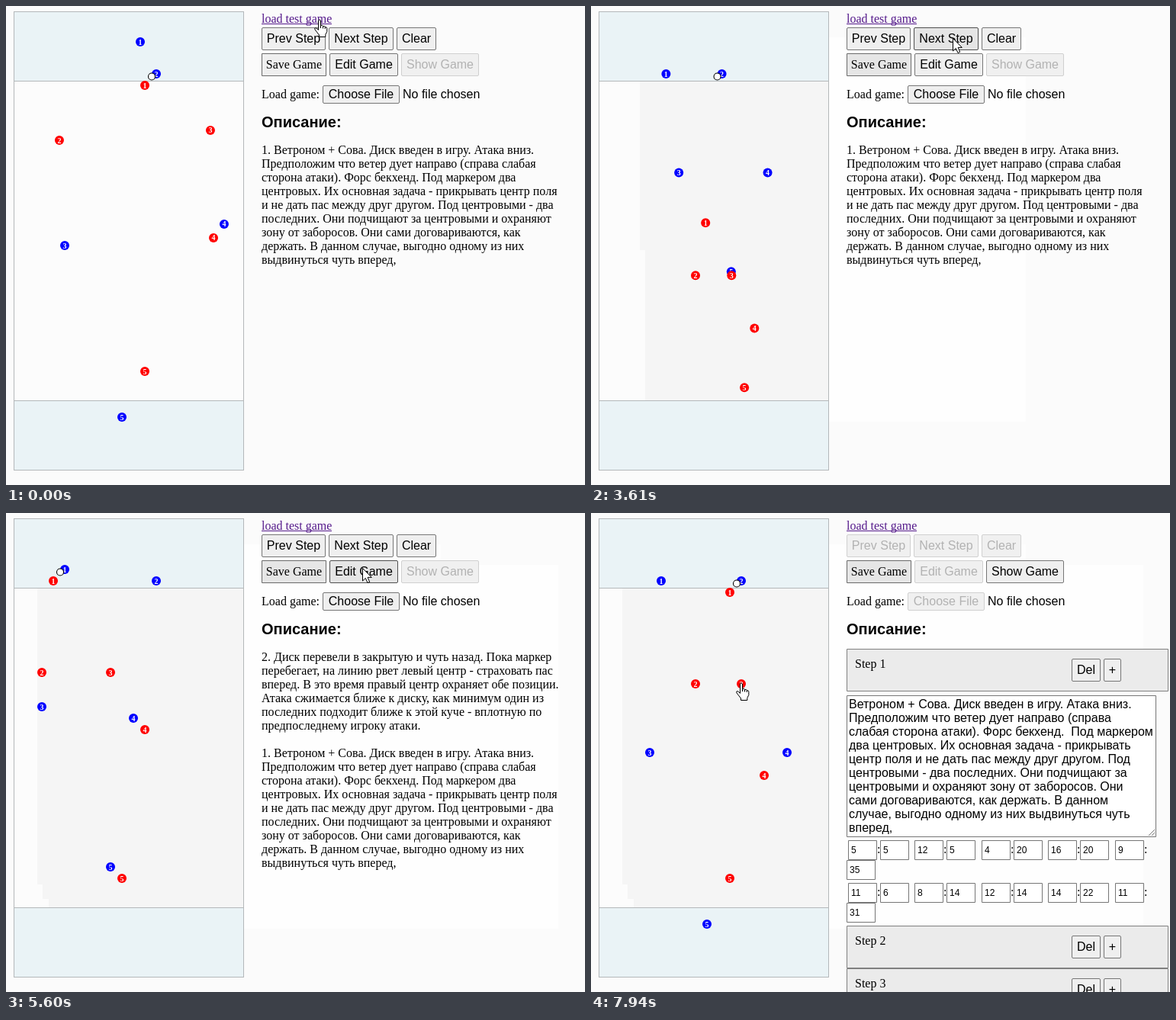
Animation of 759 by 628 pixels, one loop 8 s. Source, as an HTML page with a canvas:

```html
<!DOCTYPE html>
<html lang="ru">
<head>
<meta charset="utf-8">
<title>Game board</title>
<style>
html, body { margin: 0; width: 100%; height: 100%; overflow: hidden; background: #fbfbfb; }
canvas { display: block; }
</style>
</head>
<body>
<canvas id="stage" width="759" height="628"></canvas>
<script>
const g = document.getElementById('stage').getContext('2d');
const LOOP = 8000, TICK = 143.3, SPAN = 560;
const CLEAR = 1140, NEXT = 3260, NEXT2 = 4298, EDIT = 5870, OPEN = 6200;
const SERIF = '"Liberation Serif", serif';
const SANS = '"Liberation Sans", sans-serif';

// Grid places: five blue, then five red.
const step1 = [[5, 5], [12, 5], [4, 20], [16, 20], [9, 35],
               [11, 6], [8, 14], [12, 14], [14, 22], [11, 31]];
const step2 = [[4, 4], [12, 5], [2, 16], [10, 17], [8, 30],
               [3, 5], [2, 13], [8, 13], [11, 18], [9, 31]];
const cleared = step1.map((p, i) => [6 + 2 * (i % 5), i < 5 ? 5 : 34.33]);
const scattered = Object.assign([...step1], {
  0: [10.6, 2.2], 3: [17.93, 18.13], 6: [3.53, 10.8], 7: [16.73, 9.93], 8: [17, 19.33]
});

// The disc goes from one blue holder to another.
const moves = [
  { start: 0, from: scattered, to: step1, disc: [1, 1] },
  { start: CLEAR + 160, from: step1, to: cleared, disc: [1, 1] },
  { start: NEXT, from: cleared, to: step1, disc: [1, 1] },
  { start: NEXT2, from: step1, to: step2, disc: [1, 0] },
  { start: OPEN, from: step2, to: step1, disc: [0, 1] }
];

const stops = [
  { at: 0, travel: 0, x: 411, y: 17, hand: true },
  { at: 850, travel: 700, x: 550, y: 40, over: 'Clear' },
  { at: 2430, travel: 800, x: 483, y: 33, over: 'Next Step' },
  { at: 3200, travel: 600, x: 474, y: 42, over: 'Next Step' },
  { at: 4720, travel: 300, x: 518, y: 64, over: 'Edit Game' },
  { at: 5500, travel: 600, x: 467, y: 72, over: 'Edit Game' },
  { at: 6170, travel: 290, x: 480, y: 200, hand: true },
  { at: 7790, travel: 740, x: 197, y: 222, hand: true }
];

const note1 = [
  '1. Ветроном + Сова. Диск введен в игру. Атака вниз.',
  'Предположим что ветер дует направо (справа слабая',
  'сторона атаки). Форс бекхенд. Под маркером два',
  'центровых. Их основная задача - прикрывать центр поля',
  'и не дать пас между друг другом. Под центровыми - два',
  'последних. Они подчищают за центровыми и охраняют',
  'зону от заборосов. Они сами договариваются, как',
  'держать. В данном случае, выгодно одному из них',
  'выдвинуться чуть вперед,'
];
const note2 = [
  '2. Диск перевели в закрытую и чуть назад. Пока маркер',
  'перебегает, на линию рвет левый центр - страховать пас',
  'вперед. В это время правый центр охраняет обе позиции.',
  'Атака сжимается ближе к диску, как минимум один из',
  'последних подходит ближе к этой куче - вплотную по',
  'предпоследнему игроку атаки.'
];
const editText = [
  'Ветроном + Сова. Диск введен в игру. Атака вниз.',
  'Предположим что ветер дует направо (справа',
  'слабая сторона атаки). Форс бекхенд.  Под маркером',
  'два центровых. Их основная задача - прикрывать',
  'центр поля и не дать пас между друг другом. Под',
  'центровыми - два последних. Они подчищают за',
  'центровыми и охраняют зону от заборосов. Они',
  'сами договариваются, как держать. В данном',
  'случае, выгодно одному из них выдвинуться чуть',
  'вперед,'
];

const arrow = new Path2D('M.5 .5V17L4.3 13.4L7 19.5L9.7 18.4L7.1 12.4H12.3Z');
const hand = new Path2D('M5.5 2Q7 -.4 8.5 2V8.5Q11.3 7.8 11.5 9.5Q14 8.8 14.2 10.6Q16.7 10.3 16.8 12.5V16.5L14.8 20.5V23.5H6.5V21L.9 13.8Q0 11 2.8 11.8L5.5 14.4Z M8.5 8.5V12 M11.5 9.5V12.5 M14.2 10.6V13');

const lerp = (a, b, k) => a + (b - a) * k;
const clamp = k => Math.max(0, Math.min(1, k));

function text(s, x, y, font = '16px ' + SERIF, color = '#000', align = 'left') {
  g.font = font;
  g.fillStyle = color;
  g.textAlign = align;
  g.fillText(s, x, y);
}

function lines(list, x, y, font) {
  list.forEach((s, i) => text(s, x, y + 18 * i, font));
}

function box(x, y, w, h, fill, stroke, r = 0) {
  g.beginPath();
  g.roundRect(x + .5, y + .5, w - 1, h - 1, r);
  g.fillStyle = fill;
  g.fill();
  g.lineWidth = 1;
  g.strokeStyle = stroke;
  g.stroke();
}

function button(label, x, y, w, h, off, hot) {
  box(x, y, w, h, off ? '#f0f0f0' : hot ? '#e5e5e5' : '#efefef',
      off ? '#d0d0d0' : hot ? '#4f4f4f' : '#767676', 1.5);
  text(label, x + w / 2, y + h / 2 + 5, '16px ' + SANS, off ? '#b2b2b2' : '#000', 'center');
}

// Pixel places of all players, and of the disc as the last item.
function layout(t) {
  const { start, from, to, disc } = moves.findLast(m => t >= m.start);
  const k = clamp((t - start) / SPAN);
  const place = (a, b) => [17 + 15 * lerp(a[0], b[0], k), 14 + 15 * lerp(a[1], b[1], k)];
  const [x, y] = place(from[disc[0]], to[disc[1]]);
  return [...from.map((p, i) => place(p, to[i])), [x - 6, y + 3.5]];
}

// Every move repaints the area around the moving players in another tone.
function repaint(t, color) {
  g.fillStyle = color;
  let before = layout(0);
  for (let s = TICK; s <= Math.min(t, EDIT) + 1; s += TICK) {
    const now = layout(s);
    const moved = now.flatMap((p, i) =>
      Math.hypot(p[0] - before[i][0], p[1] - before[i][1]) > .01 ? [p, before[i]] : []);
    if (moved.length) {
      const left = Math.round(Math.min(...moved.map(p => p[0])) - 6);
      const top = Math.round(Math.min(...moved.map(p => p[1])) - 6);
      const bottom = Math.round(Math.max(...moved.map(p => p[1])) + 6);
      g.fillRect(left, top, (s < NEXT2 ? 570 : 724) - left, bottom - top);
    }
    before = now;
  }
}

function field(t) {
  g.fillStyle = '#fbfbfb';
  g.fillRect(0, 0, 759, 628);
  repaint(t, '#fefefe');
  g.save();
  g.beginPath();
  g.rect(10, 7, 302, 602);
  g.clip();
  g.fillStyle = '#fcfcfc';
  g.fillRect(10, 7, 302, 602);
  repaint(t, '#f5f5f5');
  g.restore();
  g.fillStyle = '#eaf3f6';
  g.fillRect(10, 7, 302, 91);
  g.fillRect(10, 518, 302, 91);
  g.strokeStyle = '#b4b8ba';
  g.lineWidth = 1;
  g.strokeRect(10.5, 7.5, 301, 601);
  g.strokeRect(10.5, 98.5, 301, 419);
}

function dot(x, y, r, color) {
  g.beginPath();
  g.arc(x, y, r, 0, 7);
  g.fillStyle = color;
  g.fill();
}

function players(t) {
  const all = layout(t), disc = all.pop();
  all.forEach(([x, y], i) => {
    dot(x, y, 6, i < 5 ? '#00f' : '#f00');
    text(i % 5 + 1, x, y + 3.5, 'bold 10px ' + SERIF, '#fff', 'center');
  });
  dot(...disc, 4.5, '#fff');
  g.strokeStyle = '#000';
  g.lineWidth = 1.1;
  g.stroke();
}

function controls(t, editing) {
  const { over } = stops.findLast(s => t >= s.at - s.travel / 2);
  const tool = (label, x, y, w, h = 30, off = editing) => button(label, x, y, w, h, off, label === over);
  text('load test game', 335, 22, undefined, '#551a8b');
  g.fillRect(335, 23, 92, 1);
  tool('Prev Step', 335, 28, 84);
  tool('Next Step', 423, 28, 85);
  tool('Clear', 512, 28, 52);
  box(335, 62, 85, 30, t ? '#e6e6e6' : '#efefef', '#6a6a6a');
  text('Save Game', 377.5, 82, undefined, '#000', 'center');
  tool('Edit Game', 424, 62, 90);
  tool('Show Game', 518, 62, 102, 30, !editing);
  text('Load game:', 335, 121);
  tool('Choose File', 415, 104, 101, 24);
  text('No file chosen', 520, 121, '16px ' + SANS);
  text('Описание:', 335, 159, 'bold 20px ' + SANS);
}

function stepRow(n, y) {
  box(335, y, 422, 56, '#ebebeb', '#808080');
  text('Step ' + n, 346, y + 25);
  button('Del', 630, y + 13, 38, 30);
  button('+', 672, y + 13, 23, 30);
}

function numberBox(value, x, y) {
  box(x, y, 38, 26, '#fff', '#767676');
  text(value, x + 4, y + 17, '12px ' + SANS);
}

function editor() {
  box(335, 239, 406, 186, '#fff', '#767676');
  lines(editText, 338, 256, '16px ' + SANS);
  g.beginPath();
  for (const d of [4, 8]) {
    g.moveTo(739 - d, 423);
    g.lineTo(739, 423 - d);
  }
  g.stroke();
  step1.forEach(([a, b], i) => {
    const c = i % 5, x = 337 + Math.round(87.4 * c), y = i < 5 ? 429 : 485;
    numberBox(a, x, y);
    text(':', x + 38, y + 17);
    if (c < 4) numberBox(b, x + 42, y);
    else numberBox(b, 335, y + 26);
  });
}

function notes(t) {
  if (t >= NEXT2) {
    lines(note2, 335, 194);
    lines(note1, 335, 320);
  } else if (t < CLEAR || t >= NEXT) lines(note1, 335, 194);
}

function cursor(t) {
  let { x, y } = stops[0];
  for (const s of stops.slice(1)) {
    const k = clamp((t - s.at + s.travel) / s.travel), ease = k * k * (3 - 2 * k);
    x = lerp(x, s.x, ease);
    y = lerp(y, s.y, ease);
  }
  const pointing = stops.findLast(s => t >= s.at - s.travel / 2).hand;
  const shape = pointing ? hand : arrow;
  g.save();
  g.translate(Math.round(x) - (pointing ? 7 : 0), Math.round(y));
  g.fillStyle = '#fff';
  g.fill(shape);
  g.strokeStyle = '#000';
  g.lineWidth = 1;
  g.lineJoin = 'round';
  g.stroke(shape);
  g.restore();
}

function draw(t) {
  const editing = t >= EDIT, open = t >= OPEN;
  field(t);
  players(t);
  controls(t, editing);
  if (editing) {
    for (let n = 1; n <= 8; n++) stepRow(n, 122 + 56 * n + (open && n > 1 ? 307 : 0));
    if (open) editor();
  } else notes(t);
  cursor(t);
}

const begin = performance.now();
function tick() {
  const t = (performance.now() - begin) % LOOP;
  draw(Math.floor(t / TICK) * TICK);
  requestAnimationFrame(tick);
}
tick();
</script>
</body>
</html>
```
